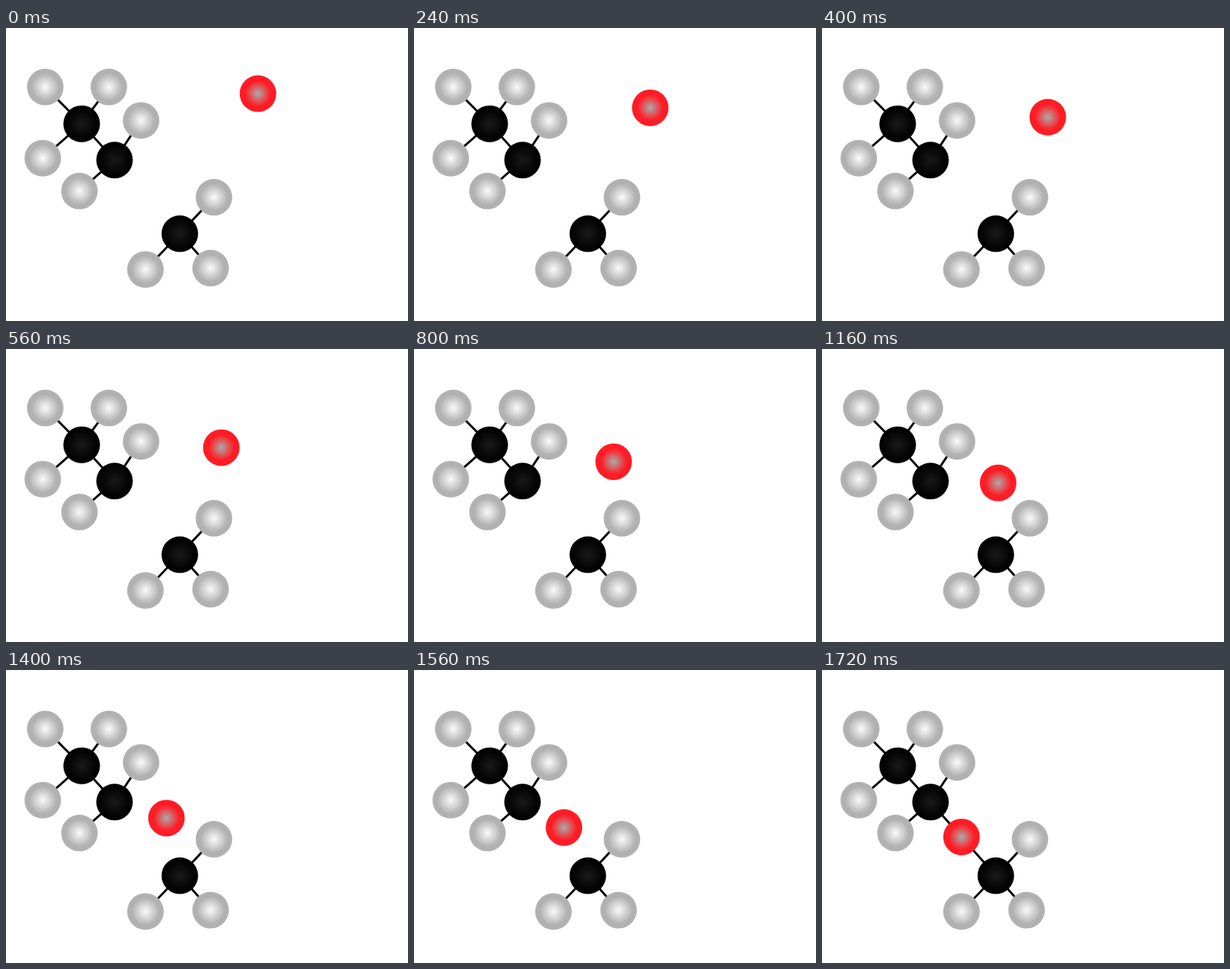
These frames come from a looping animation (550 px wide and 400 px high, 2.16 s). An HTML page with a canvas:

```html
<!DOCTYPE html>
<html lang="en">
<head>
<meta charset="utf-8">
<title>Molecule</title>
<style>
  html, body { margin: 0; width: 100%; height: 100%; overflow: hidden; background: #fff; }
  canvas { display: block; }
</style>
</head>
<body>
<canvas id="stage" width="550" height="400"></canvas>
<script>
const ctx = document.getElementById('stage').getContext('2d');
const LOOP = 2160, STEP = 40, LAST_STEP = 43, RADIUS = 25;

const point = (x, y) => ({ x, y });

// Colours: centre, rim, and where the rim colour begins
const HYDROGEN = { centre: '#fafafa', rim: '#b1b1b1', reach: 0.75 };
const CARBON = { centre: '#191919', rim: '#000', reach: 0.9 };
const OXYGEN = { centre: '#aaa', rim: '#ff1c24', reach: 0.7 };

// Each carbon with the hydrogens bonded to it
const groups = [
  { carbon: point(103.6, 130.7), hydrogens: [point(53.7, 80.6), point(140.7, 80.6), point(50.3, 177.7)] },
  { carbon: point(148.5, 180.3), hydrogens: [point(184.8, 126.2), point(100.5, 222.6)] },
  { carbon: point(237.8, 280.8), hydrogens: [point(284.5, 231.1), point(190.8, 329.7), point(279.9, 327.8)] }
];
const [first, second, third] = groups.map(group => group.carbon);
const start = point(344.7, 89.6), end = point(190.9, 227.9);

function drawBond(from, to) {
  ctx.beginPath();
  ctx.moveTo(from.x, from.y);
  ctx.lineTo(to.x, to.y);
  ctx.stroke();
}

function drawAtom({ x, y }, { centre, rim, reach }) {
  const fill = ctx.createRadialGradient(x, y, 0, x, y, RADIUS * reach);
  fill.addColorStop(0, centre);
  fill.addColorStop(1, rim);
  ctx.fillStyle = fill;
  ctx.beginPath();
  ctx.arc(x, y, RADIUS, 0, 2 * Math.PI);
  ctx.fill();
}

function draw(time) {
  const step = Math.min(Math.floor((time % LOOP) / STEP), LAST_STEP);
  const progress = step / LAST_STEP;
  const oxygen = point(
    start.x + (end.x - start.x) * progress,
    start.y + (end.y - start.y) * progress
  );

  ctx.clearRect(0, 0, 550, 400);
  ctx.lineWidth = 3;
  drawBond(first, second);
  if (step === LAST_STEP) [second, third].forEach(carbon => drawBond(carbon, oxygen));

  // A pale rim shows just below the first carbon
  drawAtom(point(first.x - 0.4, first.y + 0.6), HYDROGEN);
  for (const { carbon, hydrogens } of groups) {
    hydrogens.forEach(hydrogen => drawBond(carbon, hydrogen));
    hydrogens.forEach(hydrogen => drawAtom(hydrogen, HYDROGEN));
    drawAtom(carbon, CARBON);
  }
  drawAtom(oxygen, OXYGEN);
}

function tick() {
  draw(performance.now());
  requestAnimationFrame(tick);
}
tick();
</script>
</body>
</html>
```
